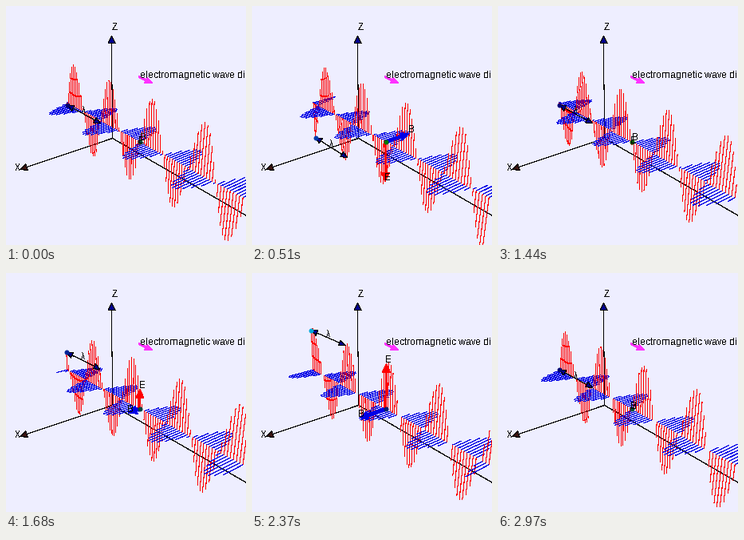
These frames come from a looping animation (301 px wide and 299 px high, 3000 ms). A matplotlib script:

```python
import numpy as np
import matplotlib as mpl
import matplotlib.pyplot as plt
from matplotlib.animation import FuncAnimation
from matplotlib.collections import LineCollection

W, H, DPI = 301, 299, 64
PX = 72 / DPI
HAIR = 0.05 * PX  # unsmoothed strokes this thin cover one pixel
FRAMES = 100
INTERVAL = 30

mpl.rcParams["font.family"] = "Liberation Sans"
mpl.rcParams["text.antialiased"] = False
mpl.rcParams["text.hinting"] = "default"
mpl.rcParams["text.hinting_factor"] = 1

RED, BLUE, NAVY = "#ff0000", "#0000e6", "#000090"

# Perspective: start of the wave and the vanishing points of the three axes
START = np.array([76.5, 120.5, 1.0])
VX = np.array([1032.0, -137.0, 1.0])
VY = np.array([-400.0, -136.8, 1.0])
VZ = np.array([150.0, 1400.0, 1.0])
KX, KY, KZ = 0.0325, 0.080, 0.039

PER_WAVE = 20
S = np.arange(4 * PER_WAVE) / PER_WAVE


def project(s, b=0.0, e=0.0):
    """Screen position at s wavelengths with field offsets b (X) and e (Z)."""
    s, b, e = (v[..., None] for v in np.broadcast_arrays(s, b, e))
    p = START - KY * s * VY - KX * b * VX - KZ * e * VZ
    return p[..., :2] / p[..., 2:]


class Arrow:
    def __init__(self, color, lw=HAIR, head=9, spread=9, fill=None, z=2, both=False):
        self.head, self.spread, self.both = head, spread, both
        self.line, = ax.plot([], [], color=color, lw=lw, zorder=z,
                             antialiased=False, solid_capstyle="butt")
        self.heads = [ax.fill([0, 0, 0], [0, 0, 0], fc=fill or color, ec=color,
                              lw=HAIR, antialiased=False, zorder=z + 0.1)[0]
                      for _ in range(2 if both else 1)]

    def set(self, tail, tip):
        tail, tip = np.asarray(tail, float), np.asarray(tip, float)
        size = np.hypot(*(tip - tail))
        u = (tip - tail) / max(size, 1e-6)
        side = np.array([-u[1], u[0]])
        k = min(1.0, size / self.head)
        back = u * self.head * k
        wing = side * self.spread / 2 * k
        ends = [(tip, back), (tail, -back)]
        for patch, (point, b) in zip(self.heads, ends):
            patch.set_xy([point, point - b + wing, point - b - wing])
        a = tail + back * 0.8 if self.both else tail
        self.line.set_data(*np.array([a, tip - back * 0.8]).T)


def label(text, x=0, y=0, z=8):
    return ax.text(x, y, text, fontsize=12 * PX, color="black", zorder=z,
                   va="baseline", ha="left", clip_on=True)


def place(text, point, dx, dy):
    text.set_position(np.round(point + np.array([dx, dy])))


def cycle(t, keys, colors):
    colors = np.array(colors) / 255
    return [np.interp(t, keys, colors[:, i], period=1) for i in range(3)]


fig = plt.figure(figsize=(W / DPI, H / DPI), dpi=DPI, facecolor="#eeeeff")
ax = fig.add_axes([0, 0, 1, 1])
ax.set_xlim(-0.5, W - 0.5)
ax.set_ylim(H - 0.5, -0.5)
ax.axis("off")

# Fixed axes and direction marker
ORIGIN = (133, 165)
Arrow("black", fill=NAVY).set(ORIGIN, (132, 37))
Arrow("black", fill="#3c1410", spread=8).set(ORIGIN, (17, 204))
ax.plot([133, 303], [165, 263], color="black", lw=HAIR, antialiased=False, zorder=2)
Arrow("#ff33ff", 2 * PX, 9, 8).set((166, 88), (183, 96))
label("Z", 132, 30)
label("X", 10, 206)
label("electromagnetic wave direction", 167, 89)

wave = LineCollection([], colors=[BLUE, RED], linewidths=HAIR,
                      antialiaseds=False, zorder=4)
ax.add_collection(wave)

span = Arrow("black", head=8, spread=7, fill=NAVY, z=5, both=True)
b_arrow = Arrow(BLUE, 2 * PX, 11, 10, z=6)
e_arrow = Arrow(RED, 2 * PX, 11, 10, z=6.2)
source, = ax.plot([], [], "o", ms=6 * PX, mew=0, zorder=5.5)
probe, = ax.plot([], [], "o", ms=6 * PX, mew=0, zorder=6.5)
e_text, b_text, span_text = label("E"), label("B"), label("λ")

KEYS = [0, 0.17, 0.33, 0.48, 0.64, 0.79]
SOURCE_COLORS = [(0, 0, 110), (0, 60, 170), (0, 225, 80),
                 (0, 0, 120), (0, 70, 180), (0, 170, 220)]
PROBE_COLORS = [(0, 80, 60), (0, 120, 0), (20, 255, 20),
                (0, 95, 0), (0, 40, 120), (0, 30, 110)]


def draw(n):
    t = n / FRAMES
    phase = (n + 1) / FRAMES
    f = np.sin(2 * np.pi * (S - phase))
    base = project(S)
    blue = np.stack([base, project(S, b=f)], axis=1)
    red = np.stack([base, project(S, e=f)], axis=1)
    wave.set_segments(np.stack([blue, red], axis=1).reshape(-1, 2, 2))

    now = -np.sin(2 * np.pi * phase)
    left, right = project(0.0, e=now), project(1.0, e=now)
    span.set(left, right)
    source.set_data([left[0]], [left[1]])
    source.set_color(cycle(t, KEYS, SOURCE_COLORS))
    place(span_text, (left + right) / 2, -3, -1)

    foot = project(2.0)
    e_tip, b_tip = project(2.0, e=now), project(2.0, b=now)
    e_arrow.set(foot, e_tip)
    b_arrow.set(foot, b_tip)
    probe.set_data([foot[0]], [foot[1]])
    probe.set_color(cycle(t, KEYS, PROBE_COLORS))
    place(e_text, e_tip, -1, -1)
    place(b_text, b_tip, -1, -1)
    return []


anim = FuncAnimation(fig, draw, frames=FRAMES, interval=INTERVAL,
                     repeat=True, repeat_delay=0)
plt.show()
```
